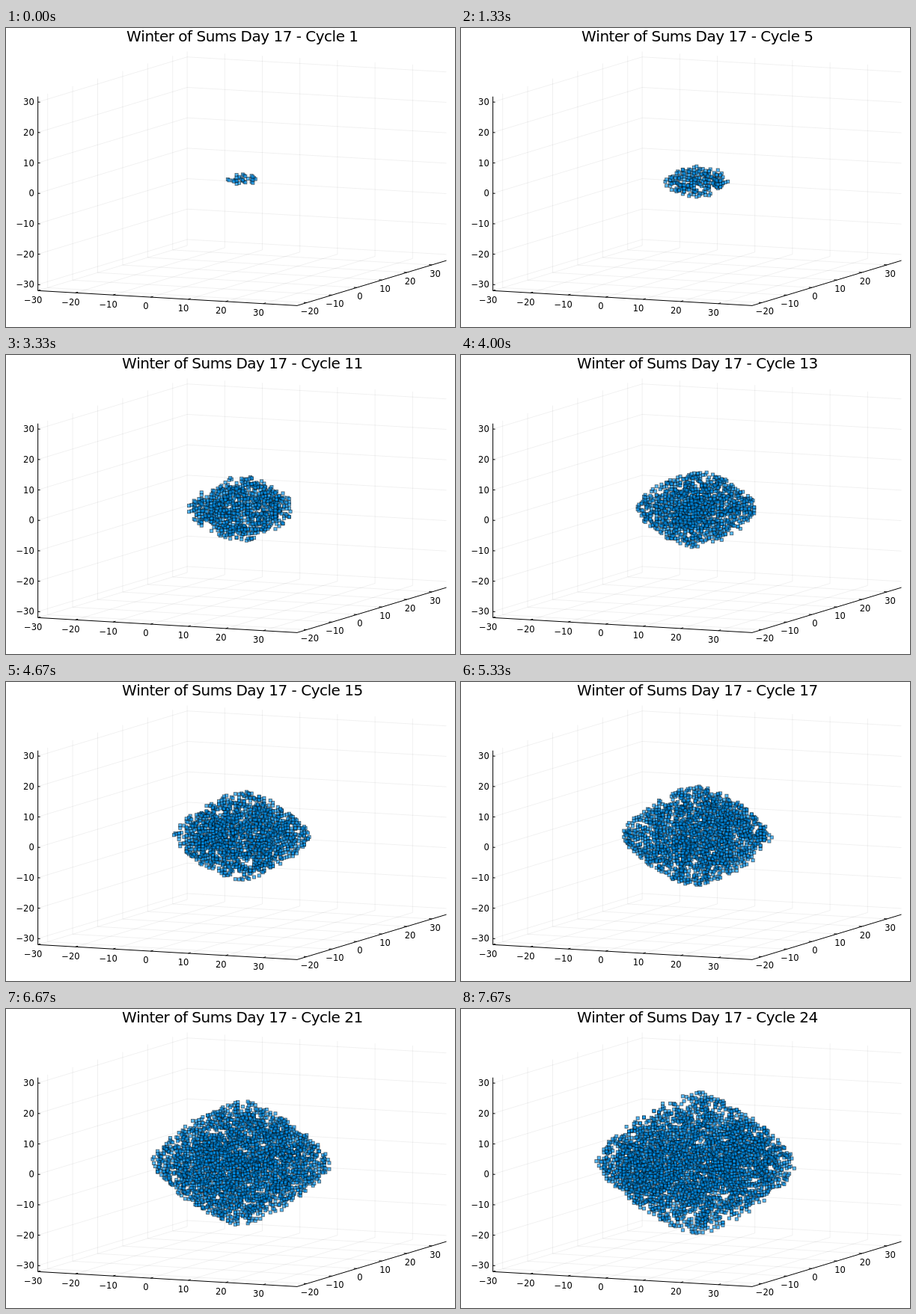
Recreate the animation shown at these times as an HTML page with a canvas. Size 600 px wide and 400 px high, loop 8000 ms.

```html
<!DOCTYPE html>
<html lang="en">
<head>
<meta charset="utf-8">
<title>Cell growth</title>
<style>
html, body { margin: 0; width: 100%; height: 100%; overflow: hidden; background: #fff; }
canvas { display: block; }
</style>
</head>
<body>
<canvas id="stage" width="600" height="400"></canvas>
<script>
const ctx = document.getElementById('stage').getContext('2d');
const LOOP = 8000, CYCLES = 24;
const X = [-30, 39], Y = [-23.9, 35.8], Z = [-32, 31.8];
const FONT = '"DejaVu Sans", sans-serif';

// Orthographic projection of plot coordinates to pixels
const project = (x, y, z) => [
  273.1 + 5.02 * x + 3.342 * y,
  205.7 + 0.29 * x - 1.01 * y - 4.07 * z
];

const range = (from, to, step) =>
  Array.from({ length: Math.floor((to - from) / step) + 1 }, (_, i) => from + i * step);

const xTicks = range(-30, 30, 10), yTicks = range(-20, 30, 10), zTicks = range(-30, 30, 10);

function path(color, width, ...points) {
  ctx.strokeStyle = color;
  ctx.lineWidth = width;
  ctx.beginPath();
  for (const p of points) ctx.lineTo(...project(...p));
  ctx.stroke();
}

function text(str, x, y, size, align, spacing = 0) {
  ctx.font = size + 'px ' + FONT;
  ctx.letterSpacing = spacing + 'px';
  ctx.fillStyle = '#000';
  ctx.textAlign = align;
  ctx.fillText(str, x, y);
}

const label = v => (v < 0 ? '\u2212' : '') + Math.abs(v);

function drawAxes() {
  const grid = (...points) => path('rgba(0,0,0,0.06)', 1, ...points);
  const line = (...points) => path('#000', 1, ...points);
  const [x0, x1] = X, [y0, y1] = Y, [z0, z1] = Z;

  for (const x of xTicks) grid([x, y0, z0], [x, y1, z0], [x, y1, z1]);
  for (const y of yTicks) grid([x1, y, z0], [x0, y, z0], [x0, y, z1]);
  for (const z of zTicks) grid([x0, y0, z], [x0, y1, z], [x1, y1, z]);

  line([x0, y0, z1], [x0, y0, z0], [x1, y0, z0], [x1, y1, z0]);
  for (const x of xTicks) line([x, y0, z0], [x, y0 + 1, z0]);
  for (const y of yTicks) line([x1, y, z0], [x1 - 0.8, y, z0]);
  for (const z of zTicks) line([x0, y0, z], [x0 + 0.6, y0, z]);

  xTicks.forEach((v, i) => text(label(v), 36.2 + 50.2 * i, 367.7 + 2.9 * i, 11.5, 'center'));
  yTicks.forEach((v, i) => text(label(v), 406 + 33.5 * i, 383.3 - 10.1 * i, 11.5, 'center'));
  zTicks.forEach(v => text(label(v), 37.7, project(X[0], Y[0], v)[1] + 4.2, 11.5, 'right'));
}

// Repeatable random value in 0..1 for a cell
function hash(x, y, z, seed) {
  let h = Math.imul(x, 374761393) ^ Math.imul(y, 668265263) ^
          Math.imul(z, 1274126177) ^ Math.imul(seed, 974634777);
  h = Math.imul(h ^ (h >>> 15), 2246822519);
  h = Math.imul(h ^ (h >>> 13), 3266489917);
  return ((h ^ (h >>> 16)) >>> 0) / 4294967296;
}

// Living cells: clumped, mirrored in z, inside a rounded octahedron
function growCells(n) {
  const rx = 0.97 * n + 3, ry = 0.85 * rx, rz = 0.98 * n + 0.6 / n;
  const power = Math.min(2, 1.2 + 3 / n);
  const density = 0.2 - 0.004 * n + 0.2 / n;
  const cells = [];
  for (let y = Math.floor(ry); y >= -ry; y--) {
    for (let x = -Math.floor(rx); x <= rx; x++) {
      for (let z = -Math.floor(rz); z <= rz; z++) {
        const u = Math.abs(x / rx), v = Math.abs(y / ry), w = Math.abs(z / rz);
        if (u ** power + v ** power + w ** power > 1) continue;
        const az = Math.abs(z);
        const clump = hash(x >> 1, y >> 1, az >> 1, n + 50) < 0.5 ? 1.45 : 0.55;
        const tip = 1 + Math.max(u, w) ** 8;
        if (hash(x, y, az, n) < density * clump * tip) cells.push([x, y, z]);
      }
    }
  }
  return cells;
}

function drawCells(n) {
  const cy = 206.3 - 4 / n, size = 4.2;
  ctx.fillStyle = 'rgba(0,150,246,0.66)';
  ctx.strokeStyle = 'rgba(0,0,0,0.6)';
  ctx.lineWidth = 0.8;
  for (const [x, y, z] of growCells(n)) {
    const px = 314.8 + 5.02 * x + 3.342 * y - size / 2;
    const py = cy + 0.27 * x - y - 4.07 * z - size / 2;
    ctx.fillRect(px, py, size, size);
    ctx.strokeRect(px, py, size, size);
  }
}

function draw(n) {
  ctx.fillStyle = '#fff';
  ctx.fillRect(0, 0, 600, 400);
  drawAxes();
  drawCells(n);
  text('Winter of Sums Day 17 - Cycle ' + n, 315.8, 18, 20, 'center', -0.5);
}

// Three cycles a second, with starts rounded to 10 ms
const startOf = n => Math.round((n - 1) * 100 / 3) * 10;

function cycleAt(t) {
  let n = 1;
  while (n < CYCLES && startOf(n + 1) <= t) n++;
  return n;
}

ctx.fontKerning = 'none';
let shown = 0, begin;
function tick(now) {
  begin ??= now;
  const n = cycleAt((now - begin) % LOOP);
  if (n !== shown) draw(shown = n);
  requestAnimationFrame(tick);
}
requestAnimationFrame(tick);
</script>
</body>
</html>
```
